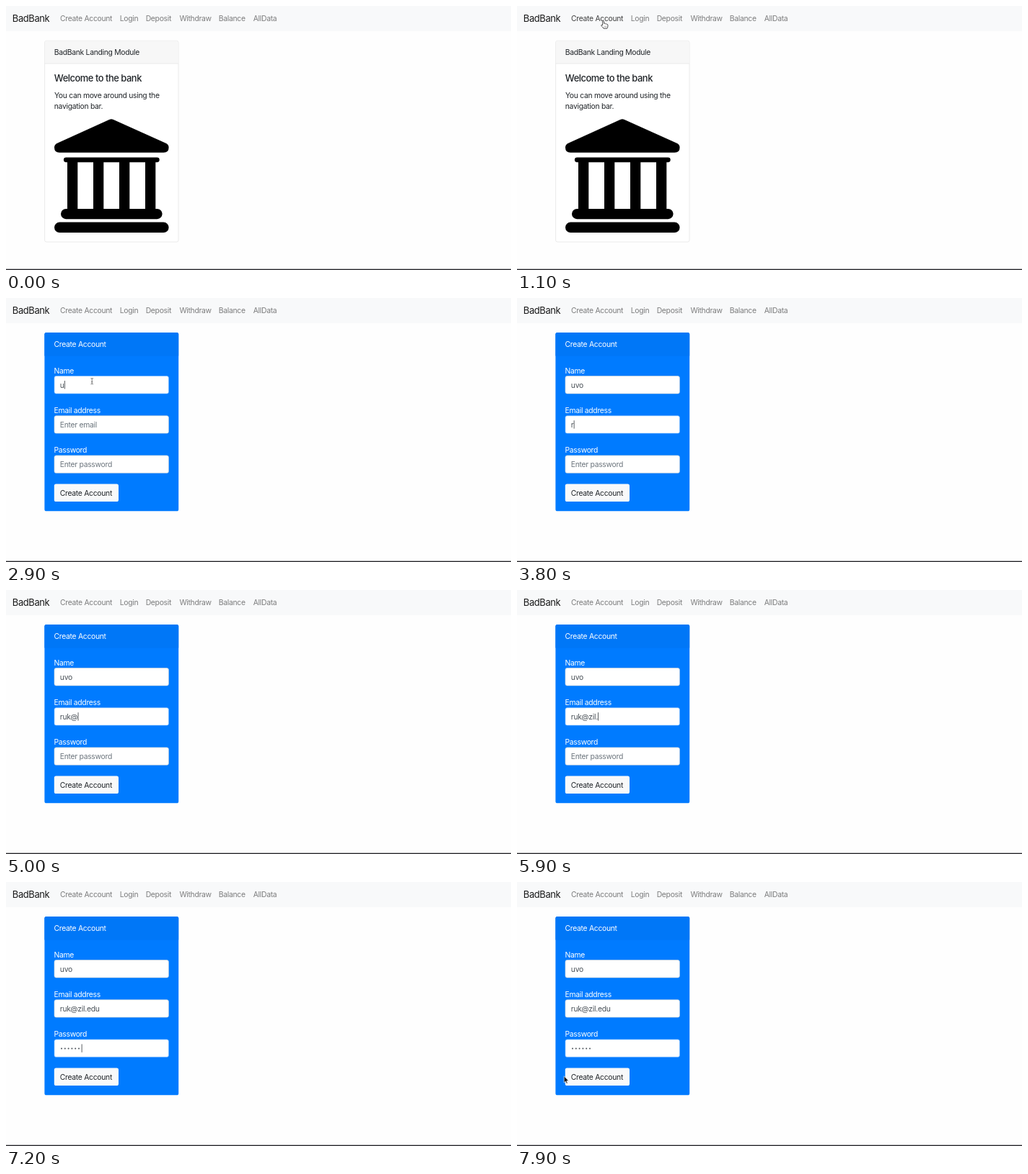
Write an HTML page that moves like this. It is 700x367 px and loops after 8 s.

```html
<!DOCTYPE html>
<html lang="en">
<head>
<meta charset="utf-8">
<title>BadBank</title>
<style>
  html, body { margin: 0; width: 100%; height: 100%; overflow: hidden; background: #fefefe; }
  svg { display: block; width: 700px; height: 367px; }
  text { font: 10.33px Inter, "Liberation Sans", sans-serif; letter-spacing: -0.027em; fill: #212529; white-space: pre; }
  .brand { font-size: 12.92px; fill: rgba(0, 0, 0, .9); }
  .title { font-size: 12.92px; font-weight: 500; letter-spacing: -0.036em; }
  .link { fill: rgba(0, 0, 0, .5); }
  .link.on { fill: rgba(0, 0, 0, .75); }
  .white text { fill: #fff; }
  .white .value { fill: #495057; }
  .white .value.hint { fill: #6c757d; }
  .white .btn { fill: #212529; }
</style>
</head>
<body>
<svg id="stage" viewBox="0 0 700 367">
  <rect width="700" height="367" fill="#fefefe"/>
  <rect width="700" height="35" fill="#f8f9fa"/>
  <text class="brand" x="8.8" y="21.9">BadBank</text>
  <g id="nav"></g>

  <g id="landing">
    <rect x="53.6" y="48.3" width="185.4" height="279.7" rx="2.6" fill="#fff" stroke="#dfdfdf" stroke-width=".65"/>
    <path d="M53.9 80V51q0-2.4 2.4-2.4h180q2.4 0 2.4 2.4v29z" fill="#f7f7f7"/>
    <path d="M53.9 80h184.8" stroke="#dfdfdf" stroke-width=".65"/>
    <text x="66.7" y="68">BadBank Landing Module</text>
    <text class="title" x="66.8" y="105.4">Welcome to the bank</text>
    <text x="66.9" y="127.8">You can move around using the</text>
    <text x="66.7" y="143.2">navigation bar.</text>
    <path d="M67 196.8Q67 192.5 71 190.7L143 157.9Q146 156.5 149 157.9L221.6 190.7Q225.6 192.5 225.6 196.8Q225.6 203.8 218.5 203.8H74Q67 203.8 67 196.8Z"/>
    <rect x="79.9" y="210.4" width="132.8" height="6.8" rx="3.4"/>
    <g id="columns"></g>
    <rect x="76" y="282" width="140.6" height="14.2" rx="7.1"/>
    <rect x="67" y="300.6" width="158.6" height="14.4" rx="7.2"/>
  </g>

  <g id="form" class="white">
    <rect x="53.4" y="48" width="185.8" height="248.3" rx="2.6" fill="#007bff"/>
    <path d="M53.4 80.5V50.6q0-2.6 2.6-2.6h180.6q2.6 0 2.6 2.6v29.9z" fill="#0077f7"/>
    <text x="66.5" y="68">Create Account</text>
    <g id="fields"></g>
    <rect x="66.8" y="258.5" width="89.2" height="24.6" rx="2.6" fill="#f8f9fa"/>
    <text class="btn" x="74.8" y="274.7">Create Account</text>
    <rect id="caret" width=".8" height="11.4" fill="#33383d"/>
  </g>

  <rect y="365.6" width="700" height="1.4" fill="#29292d"/>

  <g id="arrow">
    <path d="M0 0V9.2L2.1 7.3L3.5 10.4L5 9.7L3.6 6.7H6.4Z" fill="#111" stroke="#fff" stroke-width=".6"/>
  </g>
  <g id="hand">
    <path d="M-1 .8Q0-.6 1 .8V3.6Q2.2 2.9 2.8 4Q4.1 3.4 4.6 4.5Q6.3 4.2 6.3 5.8V7.4Q6.2 8.8 5.3 10.4H.4Q-.8 8.4-2.9 6.6Q-3.2 5-1 5.9Z" fill="#fff" stroke="#222" stroke-width=".8" stroke-linejoin="round"/>
    <path d="M1.3 6.8V9M2.8 6.8V9M4.3 6.8V9" stroke="#555" stroke-width=".4"/>
  </g>
  <g id="beam">
    <path d="M-1.7-4.2Q0-4.2 0-3V3Q0 4.2-1.7 4.2M1.7-4.2Q0-4.2 0-3M0 3Q0 4.2 1.7 4.2M-1 1H1" fill="none" stroke="#555" stroke-width=".75"/>
  </g>
</svg>
<script>
const LOOP = 8000;
const $ = id => document.getElementById(id);

function add(parent, tag, attrs, text = "") {
  const el = document.createElementNS("http://www.w3.org/2000/svg", tag);
  for (const k in attrs) el.setAttribute(k, attrs[k]);
  el.textContent = text;
  return parent.appendChild(el);
}

const show = (el, on) => el.setAttribute("visibility", on ? "visible" : "hidden");

const links = [
  ["Create Account", 75], ["Login", 157.8], ["Deposit", 193.7],
  ["Withdraw", 240.4], ["Balance", 294.8], ["AllData", 342.7]
].map(([label, x]) => add($("nav"), "text", { class: "link", x, y: 21.3 }, label));

for (let i = 0; i < 4; i++)
  add($("columns"), "rect", { x: 85 + i * 36, y: 216, width: 14.3, height: 67 });

// Each key time adds one character.
const fields = [
  { label: "Name", hint: "Enter name", text: "uvo", keys: [2900, 3100, 3400], focus: 1900 },
  { label: "Email address", hint: "Enter email", text: "ruk@zil.edu", focus: 3700,
    keys: [3800, 3900, 3900, 5000, 5500, 5600, 5800, 5900, 6100, 6200, 6400] },
  { label: "Password", hint: "Enter password", text: "", focus: 6500,
    keys: [6700, 6800, 6900, 7000, 7100, 7200] }
];

fields.forEach((f, i) => {
  const y = f.y = 108.5 + i * 55.2, g = $("fields");
  add(g, "text", { x: 66.5, y: y - 3.9 }, f.label);
  f.box = add(g, "rect", { x: 67, y, width: 158.4, height: 24.4, rx: 2.6, fill: "#fff", "stroke-width": .65 });
  f.value = add(g, "text", { x: 74.8, y: y + 16.2 });
  f.dots = f.text ? [] : f.keys.map((_, n) =>
    add(g, "circle", { cx: 77 + n * 4.8, cy: y + 12.6, r: 1, fill: "#495057" }));
});

// Pointer paths: time, x, y
const paths = [
  [[400, 366, 150], [1000, 119.6, 20.8], [1300, 119.6, 20.8], [1400, 119.5, 42],
   [1700, 117.2, 129.5], [2000, 119.2, 115.6], [3100, 119.2, 115.6]],
  [[7500, 1, 214], [7900, 65.2, 269.8], [8000, 65.2, 269.8]]
];

function pointer(t) {
  const path = paths.find(p => t >= p[0][0] && t < p[p.length - 1][0]);
  if (!path) return null;
  const i = path.findIndex(p => p[0] > t);
  const [t0, x0, y0] = path[i - 1], [t1, x1, y1] = path[i];
  const u = (t - t0) / (t1 - t0), e = u * u * (3 - 2 * u);
  return [x0 + (x1 - x0) * e, y0 + (y1 - y0) * e];
}

function shape(t) {
  if (t >= 900 && t < 1400) return "hand";
  return t >= 1600 && t < 3100 ? "beam" : "arrow";
}

function drawPointer(t) {
  const p = pointer(t), kind = shape(t);
  for (const id of ["arrow", "hand", "beam"]) {
    show($(id), p && id === kind);
    if (p) $(id).setAttribute("transform", `translate(${p[0]} ${p[1]})`);
  }
}

function drawForm(t) {
  const on = t >= 1200;
  let active = null;
  for (const f of fields) {
    const n = f.keys.filter(k => k <= t).length;
    f.value.textContent = n ? f.text.slice(0, n) : f.hint;
    f.value.setAttribute("class", n ? "value" : "value hint");
    f.dots.forEach((d, i) => show(d, on && i < n));
    f.box.setAttribute("stroke", "#ced4da");
    if (t >= f.focus) active = { f, n };
  }
  const blink = (t >= 2400 && t < 2900) || (t >= 4400 && t < 4800) || t >= 7700;
  show($("caret"), active && on && !blink);
  if (!active) return;
  const { f, n } = active;
  f.box.setAttribute("stroke", "#80bdff");
  const w = !n ? 0 : f.text ? f.value.getComputedTextLength() : n * 4.8 + .8;
  $("caret").setAttribute("x", 75.1 + w);
  $("caret").setAttribute("y", f.y + 6.5);
}

function draw(ms) {
  const t = Math.floor(ms % LOOP / 100) * 100;
  show($("landing"), t < 1200);
  show($("form"), t >= 1200);
  links[0].classList.toggle("on", t >= 900 && t < 1900);
  drawForm(t);
  drawPointer(t);
}

const start = performance.now();
function tick() {
  draw(performance.now() - start);
  requestAnimationFrame(tick);
}
tick();
</script>
</body>
</html>
```
